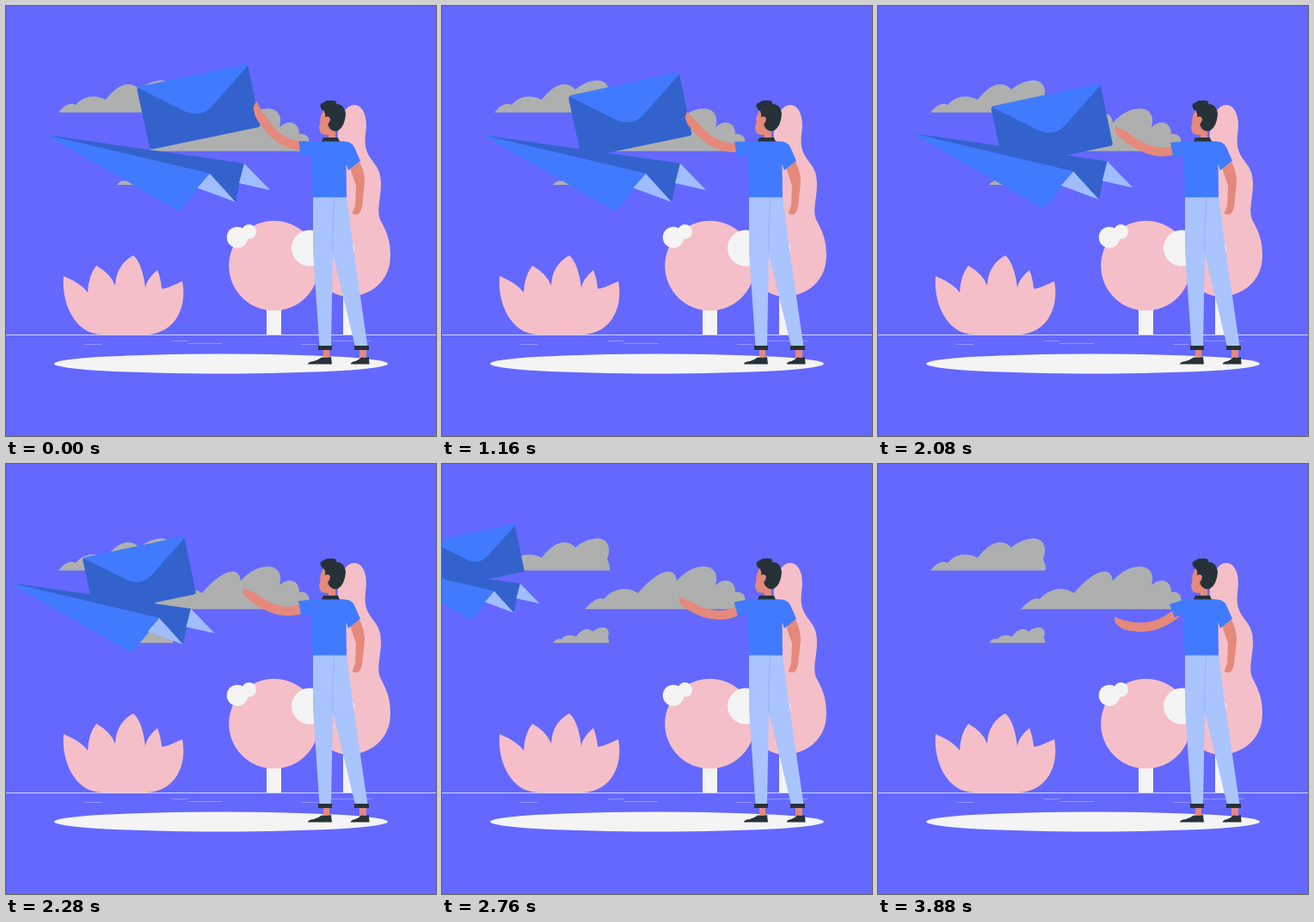
These frames come from a looping animation (500 px wide and 500 px high, 4.96 s). An HTML page:

```html
<!DOCTYPE html>
<html lang="en">
<head>
<meta charset="utf-8">
<title>Sending a letter</title>
<style>
html, body { margin: 0; height: 100%; overflow: hidden; background: #6468ff; }
svg { display: block; width: 100vw; height: 100vh; }
.pink { fill: #f4bfc8; }
.white { fill: #f4f4f4; }
.cloud { fill: #aeb0af; }
.blue { fill: #407bff; }
.navy { fill: #3362cc; }
.pale { fill: #a0bdff; }
.denim { fill: #aac4ff; }
.skin { fill: #e4897b; }
.dark { fill: #263238; }
</style>
</head>
<body>
<svg viewBox="0 0 500 500">
  <g class="cloud">
    <path id="puff" d="M61 123.700Q72 110 81 115C92 102 106 104 116 109C130 90 145 86 155 97C180 78 201 86 192 111Q195 115 195 123.700Z"/>
    <use href="#puff" transform="translate(99.300 147.800) scale(.487)"/>
    <path d="M166 168.700Q180 153 188 157C200 144 215 142 228 150C252 122 271 118 273 136C293 112 326 114 318 141C329 131 341 135 341 149Q352 147 353 160V168.700Z"/>
  </g>

  <path id="lotus" class="pink"/>

  <path class="white" d="M303 345h17v37h-17ZM392 330h12v52h-12Z"/>
  <circle class="pink" cx="311.500" cy="302" r="52.300"/>
  <path class="pink" d="M386 160C382 108 419 101 419 139C418 152 416 160 420 170C426 184 436 186 436 207C436 225 430 239 436 250C441 260 447 270 447 290C447 320 424 338 396 338Q375 336 361 315Z"/>
  <g class="white">
    <circle cx="269" cy="269" r="12.300"/>
    <circle cx="282.500" cy="262.500" r="8.500"/>
    <circle cx="353" cy="281.500" r="21"/>
    <circle cx="395" cy="282" r="10"/>
  </g>

  <path d="M0 382.500H500" stroke="#d3d3f2"/>
  <path d="M91 393.500h20M211 392.500h40M193 389.500h18M343 393.500h18M377 389.500h48" stroke="#a0a3fb" stroke-width=".8"/>
  <ellipse class="white" cx="250" cy="416" rx="194" ry="11.500"/>

  <g id="flight">
    <g id="letter">
      <path class="navy" stroke="#3362cc" stroke-width="6" stroke-linejoin="round" d="M155.500 97.500L278.500 70.500L292.500 138L170 163.500Z"/>
      <path class="blue" d="M153 95Q153 94 156 93.500L278 67.500Q281 67 281.500 69L239 117Q227 130 208 122.500Z"/>
    </g>
    <path class="navy" d="M47 150L277 183L267 228L237 195Z"/>
    <path class="blue" d="M47 150L238 195L202 239Z"/>
    <path class="pale" d="M237 195L267 228L222.500 211.500ZM277 183L307 214L271 206Z"/>
  </g>

  <path class="skin" d="M370 120Q364 129 365.500 136L364 141Q364 150 373 150H375V154H383V140Z"/>
  <path class="dark" d="M366 118Q364 113 370 112Q371 109 382 110Q385 112 384 114Q394 114 395 126Q394 140 386 145Q378 147 374.500 139Q374 136 377 131Q375 127 371 130Q372 126 370 122Q367 121 366 118Z"/>
  <ellipse class="skin" cx="373.500" cy="132.500" rx="3" ry="4"/>

  <path class="skin" d="M400 188L411 181Q419 197 416.500 210L414 233Q412 243 407 242.500L402.500 241.500L406 232L407 209Z"/>
  <path class="skin" d="M369 399h7v11h-7ZM411 399h8v11h-8Z"/>
  <path class="denim" d="M357 222H396L404 283L420.500 396H406L380 288L378 396H364.500L357 285Z"/>
  <path d="M382 223Q379 258 380 288" fill="none" stroke="#92aef0" stroke-width=".8"/>
  <path class="dark" d="M363 395h16v5h-16ZM405 395h17v5h-17Z"/>
  <path id="shoe" class="dark" d="M351 416.500Q351 413.500 358 413Q364 411 367 408.500Q372 409.500 378 408L379 416.500Z"/>
  <use href="#shoe" transform="translate(128.500 0) scale(.776 1)"/>

  <path id="arm" fill="none" stroke="#e4897b" stroke-width="10.500"/>
  <path id="hand" class="skin" stroke="#e4897b" stroke-linejoin="round"/>
  <path id="shirt" class="blue"/>
  <path class="dark" d="M369 153H386L388 157.500H367Z"/>
</svg>
<script>
const el = id => document.getElementById(id);
const clamp = (x, max) => Math.max(0, Math.min(max, x));
const STEP = 40, LOOP = 124;

// Petal tips, and the valleys between them
const tips = [[67, 314], [105, 302], [148, 290], [176, 307], [205, 320]];
const dips = [[95, 333], [127, 325], [162, 328], [181, 328]];
el("lotus").setAttribute("d", `M${tips[0]}` + dips.map(([x, y], i) => {
  const [ax, ay] = tips[i], [bx, by] = tips[i + 1];
  return `Q${ax + .75 * (x - ax)} ${ay + 9} ${x} ${y}Q${x + 1} ${by + 11} ${bx} ${by}`;
}).join("") + "C211 350 197 380 165 382H112C80 382 64 345 67 314Z");

function draw(now) {
  const step = Math.floor(now / STEP) % LOOP;
  const drop = clamp(step - 21, 19), fly = clamp(step - 51, 46);
  // A joint moves at one speed while the letter drops, at another while the plane flies
  const joint = (x, y, dx, dy, fx, fy) => [x + dx * drop + fx * fly, y + dy * drop + fy * fly];

  el("letter").setAttribute("transform", `translate(${-.65 * drop} ${1.265 * drop})`);
  el("flight").setAttribute("transform",
    `translate(${307 - 10.75 * fly} ${214 - 2.87 * fly}) scale(${1 - .0137 * fly}) translate(-307 -214)`);

  const tip = joint(291, 111.5, -.74, 1.5, -.04, .83);
  const palm = joint(295, 127, -.53, 1.13, .04, .84);
  const bend = joint(317, 164, .1, .68, .02, .43);
  const shoulder = joint(346, 162, 0, .25, .04, .13);
  el("arm").setAttribute("d", `M${palm}Q${bend} ${shoulder}`);

  const dx = palm[0] - tip[0], dy = palm[1] - tip[1], len = Math.hypot(dx, dy);
  const side = (along, out) => [tip[0] + dx * along + dy / len * out, tip[1] + dy * along - dx / len * out];
  el("hand").setAttribute("d", `M${tip}L${side(1, 4.5)}L${side(1.4, 0)}L${side(1, -5)}L${side(.35, -4.5)}Z`);

  const k = (drop + fly) / 65;
  el("shirt").setAttribute("d",
    `M${340.5 - 1.5 * k} ${157 + 6 * k}L356 157.500Q377 156 394 157.500Q402 158 405 164L412 180L398 191L395.500 184L396 222.500H356.500L355 174L${342.5 + 2.5 * k} ${175.5 + 3 * k}Z`);
}

function tick(now) {
  draw(now);
  requestAnimationFrame(tick);
}
draw(0);
requestAnimationFrame(tick);
</script>
</body>
</html>
```
